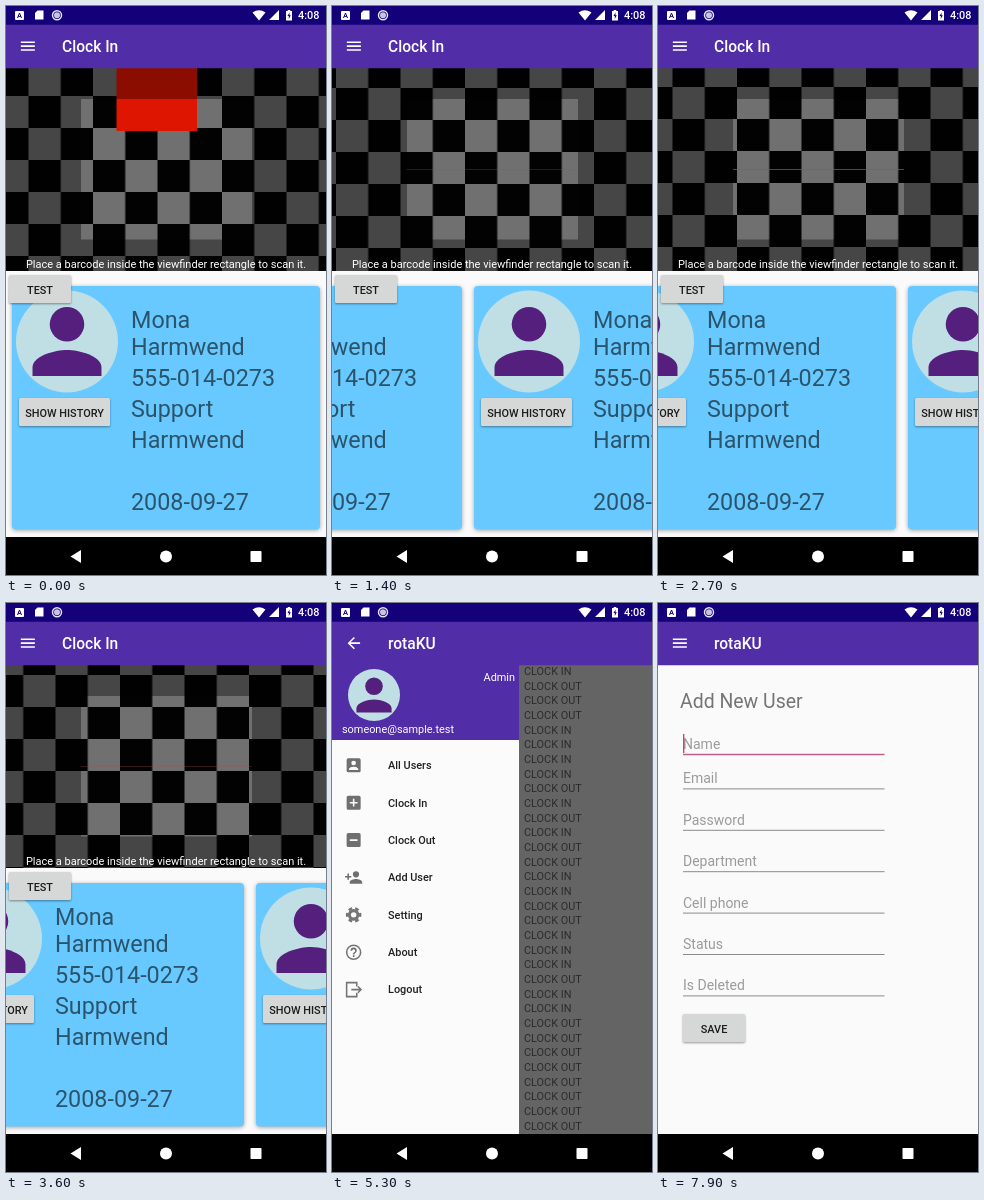
Recreate the animation shown at these times as an HTML page. Size 320x569 px, loop 8000 ms.

```html
<!DOCTYPE html>
<html lang="en">
<head>
<meta charset="utf-8">
<title>Clock In</title>
<style>
html, body { margin: 0; height: 100%; overflow: hidden; background: #000; }
svg { display: block; width: 320px; height: 569px; font: 10.9px Roboto, sans-serif; }
.med { font-weight: 500; }
.title { font-weight: 500; font-size: 15.57px; fill: #fff; }
.big { font-size: 23.35px; fill: rgba(0,0,0,.58); }
.hint { font-size: 14px; fill: #9b9b9b; }
.raised { filter: drop-shadow(0 1px 1.2px rgba(0,0,0,.4)); }
.card { filter: drop-shadow(0 1.5px 2px rgba(0,0,0,.35)); }
.line { fill: none; stroke: #757575; stroke-width: 2; }
</style>
</head>
<body>
<svg viewBox="0 0 320 569">
  <defs>
    <pattern id="checks" width="64.5" height="64" patternUnits="userSpaceOnUse">
      <path d="M0 0h32.250v32H0zM32.250 32h32.250v32H32.250z" fill="#707070"/>
    </pattern>
    <clipPath id="view"><path d="M0 62h320v203H0z"/></clipPath>
    <clipPath id="body"><path d="M0 62h320v469H0z"/></clipPath>
    <g id="person">
      <circle r="51" fill="#bfdfe4"/>
      <g fill="#551f7d" transform="scale(4.31) translate(-12 -12)">
        <circle cx="12" cy="8" r="4"/>
        <path d="M12 14c-2.67 0-8 1.34-8 4v2h16v-2c0-2.66-5.33-4-8-4z"/>
      </g>
    </g>
  </defs>

  <path d="M0 62h320v470H0z" fill="#fafafa"/>

  <g id="scan">
    <g clip-path="url(#view)">
      <path d="M0 62h320v203H0z" fill="#020202"/>
      <path d="M0 62h320v203H0z" fill="url(#checks)"/>
      <rect id="red" width="80.5" height="80" fill="#de1500"/>
      <path d="M0 62h320v203H0zM75 93v140.500h171V93z" fill-rule="evenodd" fill="#000" opacity=".38"/>
      <path id="laser" d="M75 163.500h171" stroke="#a05050"/>
      <text x="160" y="261.500" text-anchor="middle" font-size="11" fill="#fff">Place a barcode inside the viewfinder rectangle to scan it.</text>
    </g>
    <g clip-path="url(#body)"><g id="cards"></g></g>
    <g id="test"></g>
  </g>

  <g id="form">
    <text x="22" y="105" font-size="19.460" fill="#757575">Add New User</text>
    <g id="fields"></g>
  </g>

  <g id="drawer">
    <g id="history"></g>
    <path d="M0 62h320v470H0z" opacity=".6"/>
    <path d="M0 62h187v470H0z" fill="#fbfbfb"/>
    <path d="M0 62h187v75H0z" fill="#512da8"/>
    <use href="#person" transform="translate(42 92) scale(.51)"/>
    <g fill="#fff">
      <text x="183" y="78" text-anchor="end">Admin</text>
      <text x="10" y="130">someone@sample.test</text>
    </g>
    <g id="menu"></g>
  </g>

  <path d="M0 0h320v19H0z" fill="#140078"/>
  <path d="M0 18.700h320V62.300H0z" fill="#512da8"/>
  <g fill="#fff">
    <rect x="9" y="5" width="9" height="9" rx="1"/>
    <path d="M11.500 12l2-5 2 5m-3.300-1.600h2.600" fill="none" stroke="#140078"/>
    <path d="M31.500 4.500h6v9h-8.500v-6.500z"/>
    <circle cx="51" cy="9.200" r="4.500" fill="none" stroke="#e6e3f4" stroke-width="1.500"/>
    <circle cx="51" cy="9.200" r="3" fill="#c9c3e6"/>
    <path d="M246.500 6.500q6.500-4.500 13 0l-6.500 8zM273 4v10h-10z"/>
    <path d="M281.700 4h2.600v1h1.700v9.500h-6V5h1.700z"/>
    <path d="M283.500 6.500l-2 3.500h1.300v3l2-3.700h-1.300z" fill="#140078"/>
    <text class="med" x="292" y="13">4:08</text>
    <path id="icon" transform="translate(12.500 30.800) scale(.7786)"/>
  </g>
  <text id="title" class="title" x="56" y="46.300"></text>

  <path d="M0 531h320v38H0z"/>
  <g fill="#fff">
    <path d="M64.500 550.500l10.500-6.500v13z"/>
    <circle cx="160" cy="550.500" r="6"/>
    <rect x="244.500" y="545" width="11" height="11" rx=".8"/>
  </g>
</svg>
<script>
const $ = id => document.getElementById(id);
const text = (x, y, s, cls = '') => `<text x="${x}" y="${y}" class="${cls}">${s}</text>`;
const button = (x, y, w, s) =>
  `<rect class="raised" x="${x}" y="${y}" width="${w}" height="28" rx="1.5" fill="#d6d7d7"/>
   <text class="med" x="${x + w / 2}" y="${y + 18.500}" text-anchor="middle" fill="#1c1c1c">${s}</text>`;

// Carousel: identical cards, one page apart
const person = [[321.600, 'Mona'], [349, 'Harmwend'], [380, '555-014-0273'],
  [411, 'Support'], [442, 'Harmwend'], [504, '2008-09-27']];
const card = x => `<g transform="translate(${x})">
  <rect class="card" y="280" width="308" height="243.500" rx="4" fill="#67c9ff"/>
  <use href="#person" x="55" y="335.500"/>
  ${button(7, 392, 91, 'SHOW HISTORY')}
  ${person.map(([y, s]) => text(119, y, s, 'big')).join('')}</g>`;
$('cards').innerHTML = [-320, 0, 320].map(card).join('');
$('test').innerHTML = button(3, 269, 62, 'TEST');

// Clock history: I = in, O = out
$('history').innerHTML = '<path d="M0 62h320v470H0z" fill="#fafafa"/><g fill="#6c6c6c">' +
  [...'IOOOIIIIOIOIOOIIOOIIIOIIOOOOOOOO'].map((c, i) =>
    text(192, 72 + i * 14.670, c == 'I' ? 'CLOCK IN' : 'CLOCK OUT')).join('') + '</g>';

const fields = ['Name', 'Email', 'Password', 'Department', 'Cell phone', 'Status', 'Is Deleted'];
$('fields').innerHTML = fields.map((s, i) => {
  const y = i ? 139 + i * 41.400 : 145.500;
  return text(25, y, s, 'hint') + (i
    ? `<path d="M25 ${y + 5.500}h201.500" stroke="#8b8b8b"/>`
    : '<path d="M25 151.500h201.500" stroke="#c0608a" stroke-width="1.700"/><path d="M25.700 131v19" stroke="#c0406f" stroke-width="1.300"/>');
}).join('') + button(25, 411, 62, 'SAVE');

const box = 'M5 3h14a2 2 0 0 1 2 2v14a2 2 0 0 1-2 2H5a2 2 0 0 1-2-2V5a2 2 0 0 1 2-2z';
const solid = d => `<path d="${d}" fill="#6f6f6f" fill-rule="evenodd"/>`;
const menu = [
  ['All Users', solid(box + 'M12 6a3 3 0 0 0 0 6a3 3 0 0 0 0-6zM6 17c0-2 4-3.100 6-3.100s6 1.100 6 3.100v1H6z')],
  ['Clock In', solid(box + 'M11 7h2v4h4v2h-4v4h-2v-4H7v-2h4z')],
  ['Clock Out', solid(box + 'M7 11h10v2H7z')],
  ['Add User', solid('M15 4a4 4 0 0 0 0 8a4 4 0 0 0 0-8zM6 10V7H4v3H1v2h3v3h2v-3h3v-2zM15 14c-2.670 0-8 1.340-8 4v2h16v-2c0-2.660-5.330-4-8-4z')],
  ['Setting', `<circle class="line" cx="12" cy="12" r="5.500" style="stroke-width:4"/>
    <circle class="line" cx="12" cy="12" r="8.500" pathLength="12" stroke-dasharray="1.100 .9" stroke-dashoffset=".55" style="stroke-width:3"/>`],
  ['About', '<circle class="line" cx="12" cy="12" r="9"/>' +
    solid('M12 6a4 4 0 0 0-4 4h2a2 2 0 0 1 4 0c0 2-3 1.750-3 5h2c0-2.250 3-2.500 3-5a4 4 0 0 0-4-4zM11 16h2v2h-2z')],
  ['Logout', '<path class="line" d="M16 8V3H3v18h13v-5M9 12h12M17.500 8l4 4-4 4"/>'],
];
$('menu').innerHTML = menu.map(([s, icon], i) =>
  `<g transform="translate(0 ${162.300 + i * 37.380})">
    <g transform="translate(12.300 -9.300) scale(.7786)">${icon}</g>
    <text class="med" x="56" y="3.900" fill="#212121">${s}</text></g>`).join('');

const burger = 'M3 18h18v-2H3zM3 13h18v-2H3zM3 6v2h18V6z';
const arrow = 'M20 11H7.830l5.590-5.590L12 4l-8 8 8 8 1.410-1.410L7.830 13H20z';

// The preview refreshes in steps: start, card x, checker x/y, laser, red x/y.
// The checker drifts right and, three times as fast, up.
const scan = [
  [0, 6, 87, 122, 0, 110.500, 45],
  [300, 74, 87, 122, 0, 110.500, 45],
  [700, 142, 101, 82, .4, 46, 114],
  [1400, 142, 133, -14, .3],
  [2000, 32, 97, 95, 0],
  [2400, 32, 124, 14, .3],
  [2700, -70, 79, 81, .7],
  [3300, -70, 103, 9, 0],
  [3600, -70, 114, -24, .3],
  [4300, -70, 78, 88, 0, 161.500, 233],
];
const show = (id, on) => $(id).style.display = on ? '' : 'none';
const move = (id, x, y = 0) => $(id).setAttribute('transform', `translate(${x} ${y})`);

function draw(now) {
  const t = now % 8000;
  const scene = t < 5300 ? 'scan' : t < 7900 ? 'drawer' : 'form';
  for (const id of ['scan', 'drawer', 'form']) show(id, id == scene);
  const [, x, cx, cy, glow, rx, ry] = scan.findLast(s => s[0] <= t);
  move('cards', x);
  $('checks').setAttribute('patternTransform', `translate(${cx} ${cy})`);
  $('laser').setAttribute('opacity', glow);
  show('red', rx);
  if (rx) move('red', rx, ry);
  $('icon').setAttribute('d', scene == 'drawer' ? arrow : burger);
  $('title').textContent = scene == 'scan' ? 'Clock In' : 'rotaKU';
  requestAnimationFrame(draw);
}
draw(performance.now());
</script>
</body>
</html>
```
